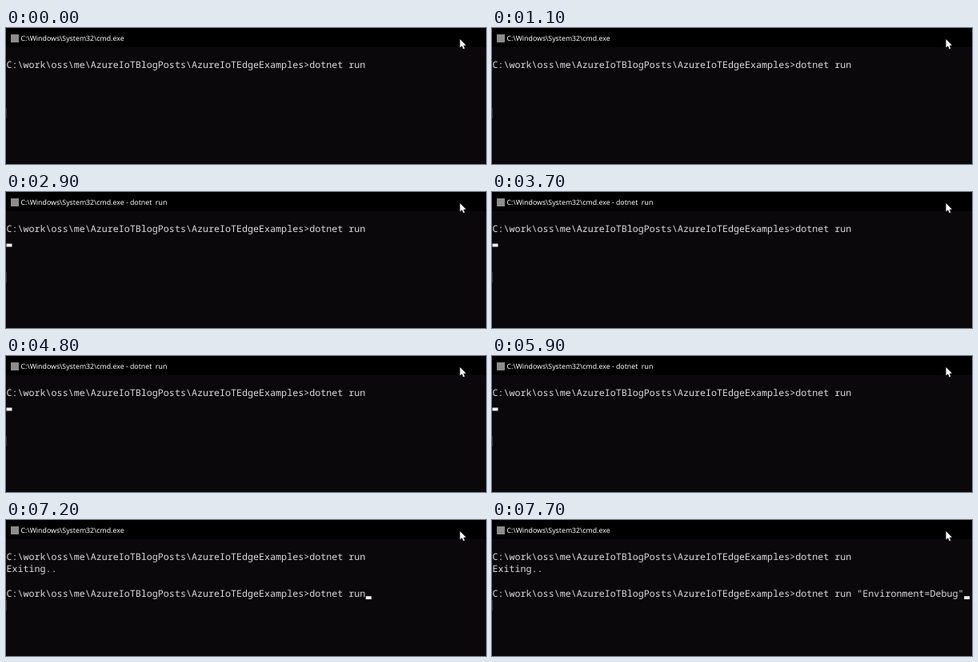
Recreate the animation shown at these times as an HTML page. Size 600 px wide and 170 px high, loop 8000 ms.

```html
<!DOCTYPE html>
<html lang="en">
<head>
<meta charset="utf-8">
<title>Console</title>
<style>
  html, body { margin: 0; width: 100%; height: 100%; overflow: hidden; background: #0b080c; }
  svg { display: block; width: 600px; height: 170px; }
  text { white-space: pre; text-rendering: geometricPrecision; }
  .console { font: 11.7px "Noto Sans Mono", monospace; fill: #dcdcdc; }
  #title { font: 8.76px "Noto Sans", sans-serif; fill: #fff; }
</style>
</head>
<body>
<svg viewBox="0 0 600 170">
  <rect width="600" height="170" fill="#0b080c"/>
  <rect width="600" height="24" fill="#000"/>
  <rect x="6" y="8" width="10" height="10" fill="#8c8c8c"/>
  <rect y="100" width="1" height="13" fill="#333"/>
  <text id="title" x="18.6" y="15.5"></text>
  <g id="rows"></g>
  <rect id="caret" width="7" height="3.9" fill="#f2f2f2"/>
  <path d="M567.5 14v10.6l2.5-2.3 1.7 3.9 1.7-.7-1.7-3.8h3.3z" fill="#fff"/>
</svg>
<script>
const LOOP = 8000, CHAR = 7.02, LEFT = 0.5, BASELINE = 49.7, PITCH = 15.3;
const PROMPT = 'C:\\work\\oss\\me\\AzureIoTBlogPosts\\AzureIoTEdgeExamples>';
const RUN = 'dotnet run';
const DEBUG_RUN = RUN + ' "Environment=Debug"';
const CARET_TOGGLES = [600, 1100, 1600, 2100, 2700, 3200, 3700, 4200, 4800, 5300, 5900, 6400, 6900];
// Second command line: [start time, text, caret visible]
const RECALL = [[7200, RUN, true], [7400, '', true], [7500, RUN, true], [7600, DEBUG_RUN, false], [7700, DEBUG_RUN, true]];

const title = document.getElementById('title');
const caret = document.getElementById('caret');
const rows = Array.from({ length: 4 }, (_, i) => {
  const row = document.createElementNS('http://www.w3.org/2000/svg', 'text');
  row.setAttribute('class', 'console');
  row.setAttribute('x', LEFT);
  row.setAttribute('y', BASELINE + i * PITCH);
  document.getElementById('rows').append(row);
  return row;
});

function setText(node, text) {
  if (node.textContent !== text) node.textContent = text;
}

function render(t) {
  const running = t >= 2900 && t < 6300;
  const exited = t >= 6300;
  const [, command, recallCaret] = RECALL.findLast(([start]) => t >= start) || [0, ''];
  const lines = [PROMPT + RUN, exited ? 'Exiting..' : '', '', exited ? PROMPT + command : ''];
  rows.forEach((row, i) => setText(row, lines[i]));
  setText(title, 'C:\\Windows\\System32\\cmd.exe' + (running ? ' - dotnet  run' : ''));

  const caretRow = exited ? 3 : running ? 1 : 0;
  const blinkOn = CARET_TOGGLES.filter(time => t >= time).length % 2 === 1;
  caret.setAttribute('x', LEFT + lines[caretRow].length * CHAR);
  caret.setAttribute('y', BASELINE - 0.4 + caretRow * PITCH);
  caret.setAttribute('visibility', recallCaret ?? blinkOn ? 'visible' : 'hidden');
}

const startTime = performance.now();
function tick() {
  render((performance.now() - startTime) % LOOP);
  requestAnimationFrame(tick);
}
tick();
</script>
</body>
</html>
```
